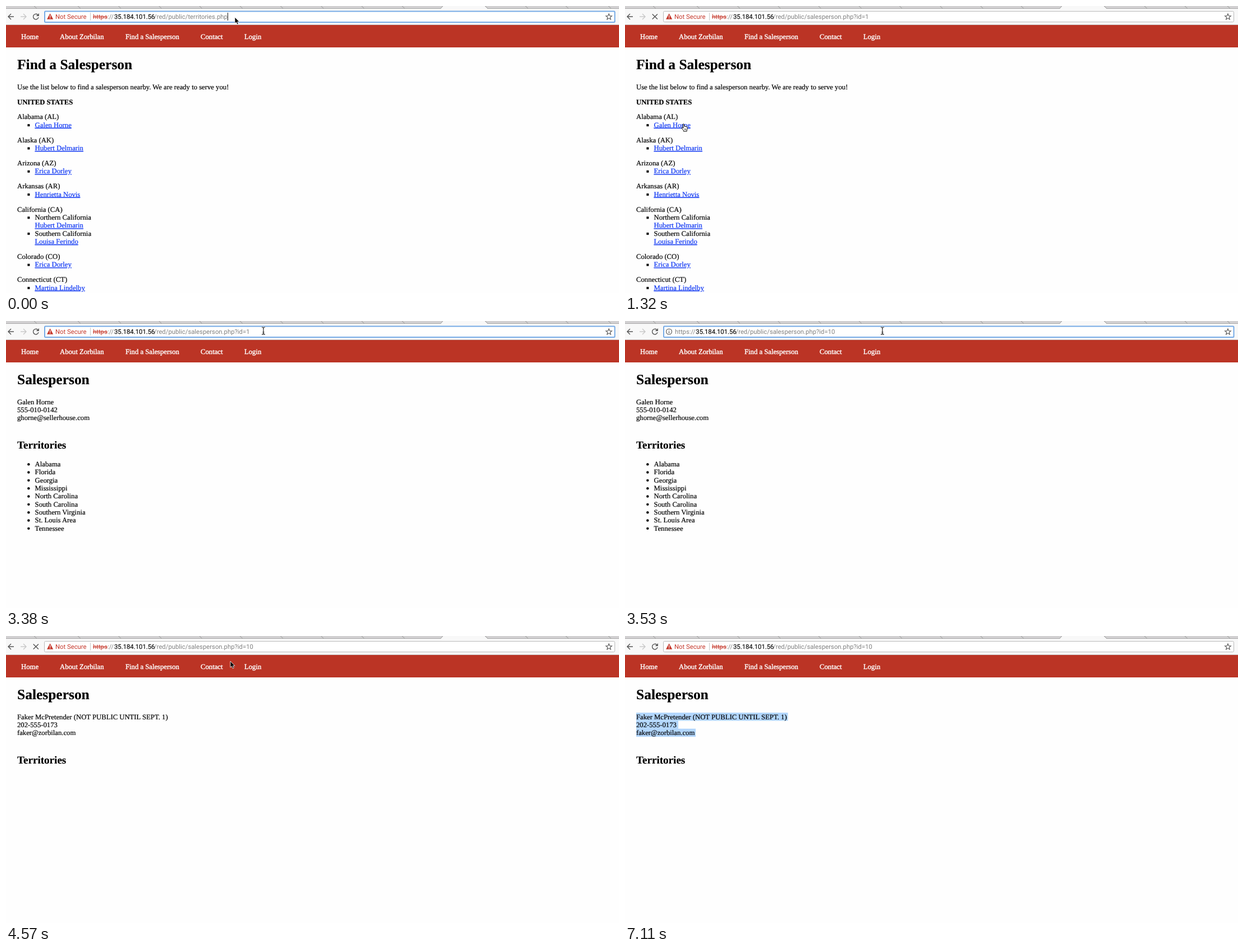
An HTML page for the animation above (8570 ms loop, 1093 px wide and 513 px high).

```html
<!DOCTYPE html>
<html lang="en">
<head>
<meta charset="utf-8">
<title>Find a Salesperson</title>
<style>
  html, body { margin: 0; width: 100%; height: 100%; overflow: hidden; background: #fefefe; }
  svg { display: block; }
  text { text-rendering: geometricPrecision; white-space: pre; }
  .page text, .nav text { font: 12.7px "Liberation Serif", "Times New Roman", serif; }
  .page text { stroke: #000; stroke-width: .2; }
  .page .h1 { font-size: 25.47px; font-weight: bold; }
  .page .h2 { font-size: 19.1px; font-weight: bold; }
  .page .b { font-weight: bold; }
  .page .link { fill: #0b34f2; stroke: #0b34f2; text-decoration: underline; }
  .nav text { fill: #fff; stroke: #fff; stroke-width: .4; }
  .bar text { font: 11.3px Roboto, "Open Sans", sans-serif; fill: #808080; }
  .bar .host { fill: #111; stroke: #111; stroke-width: .2; }
  .bar .bad { fill: #c5372a; }
  .bar .struck { text-decoration: line-through; }
  .line { fill: none; stroke: #555; stroke-width: 1.4; }
</style>
</head>
<body>
<svg id="stage" width="1093" height="513" viewBox="0 0 1093 513"></svg>
<script>
const LOOP = 8570;
const STEP = 14.33;

const text = (x, y, s, cls = '') => `<text x="${x}" y="${y}" class="${cls}">${s}</text>`;
const group = (id, body, cls = '') => `<g id="${id}" class="${cls}">${body}</g>`;
const rect = (x, y, w, h, fill) => `<rect x="${x}" y="${y}" width="${w}" height="${h}" fill="${fill}"/>`;

// Browser frame
function tabs() {
  const edges = [55, ...Array.from({ length: 9 }, (_, i) => 133 + 72.25 * i), 931, 1003, 1079];
  return rect(0, 0, 1093, 5, '#d2d1d2') + rect(0, 4, 1093, 1, '#a9a9a9') +
    edges.map(x => `<path d="M${x - 5} 0L${x} 4.5" stroke="#999" fill="none"/>`).join('') +
    '<path d="M775 5L779 0H854L859 5Z" fill="#f8f8f8"/>' +
    '<path d="M775 4.5L779 0M854 0L859 4.5" stroke="#999" fill="none"/>';
}

function toolbar() {
  const star = Array.from({ length: 10 }, (_, i) => {
    const r = i % 2 ? 2.4 : 5.6, a = i * Math.PI / 5;
    return `${(1075 + r * Math.sin(a)).toFixed(2)},${(19.5 - r * Math.cos(a)).toFixed(2)}`;
  }).join(' ');
  return rect(0, 5, 1093, 29, '#f8f8f8') + rect(0, 33, 1093, 1, '#cac4c4') +
    '<path class="line" d="M14 19H4.5M9 14L4 19L9 24"/>' +
    '<path class="line" style="stroke:#c9c9c9" d="M26 19H35.5M31 14L36 19L31 24"/>' +
    group('reload', '<path class="line" d="M56.6 15.6A4.8 4.8 0 1 0 58 20.2"/><path d="M58.8 13V18H53.8Z" fill="#555"/>') +
    group('stop', '<path class="line" d="M48.7 14.4L57.9 23.6M57.9 14.4L48.7 23.6"/>') +
    '<rect x="68.5" y="9.5" width="1017" height="19" rx="2" fill="#fff" stroke="#b9b9b9"/>' +
    '<rect id="ring" x="69" y="9.5" width="1016.5" height="19.5" rx="1.5" fill="none" stroke="#76abe6" stroke-width="2"/>' +
    `<polygon points="${star}" class="line" style="stroke-width:1.1"/>`;
}

const SALES = '/red/public/salesperson.php?id=1';

function address() {
  const warn = '<path d="M78.6 13.2L84.2 23.8H73Z" fill="#c5372a"/>' +
    '<path d="M78.6 16.6V20.4M78.6 21.3V22.6" stroke="#fff" stroke-width="1.2"/>' +
    text(88, 23, 'Not Secure', 'bad') + rect(150, 12, 1, 14, '#c8c8c8') +
    text(155, 23, 'https', 'bad struck') + text(181, 23, '://') +
    text(193, 23, '35.184.101.56', 'host');
  const info = '<circle cx="78.5" cy="19" r="5" class="line" style="stroke-width:1.1"/>' +
    '<path d="M78.5 18.2V22M78.5 15.8V17.1" stroke="#555" stroke-width="1.2"/>' +
    text(89, 23, 'https://') + text(126.3, 23, '35.184.101.56', 'host') + text(197.5, 23, SALES + '0');
  return group('warn', warn) + group('info', info) +
    group('urlList', text(264, 23, '/red/public/territories.php') + rect(395, 12, 1, 14, '#111')) +
    group('urlOne', text(264, 23, SALES)) +
    group('urlTen', text(264, 23, SALES + '0'));
}

function nav() {
  const items = [[27, 'Home'], [96, 'About Zorbilan'], [213, 'Find a Salesperson'], [347, 'Contact'], [425, 'Login']];
  return rect(0, 34, 1093, 40, '#bb3425') + items.map(([x, s]) => text(x, 59, s)).join('');
}

// Pages
const states = [
  ['Alabama (AL)', '-Galen Horne'],
  ['Alaska (AK)', '-Hubert Delmarin'],
  ['Arizona (AZ)', '-Erica Dorley'],
  ['Arkansas (AR)', '-Henrietta Novis'],
  ['California (CA)', '*Northern California', 'Hubert Delmarin', '*Southern California', 'Louisa Ferindo'],
  ['Colorado (CO)', '-Erica Dorley'],
  ['Connecticut (CT)', '-Martina Lindelby']
];

function listPage() {
  let y = 202.4;
  let out = text(20, 113.2, 'Find a Salesperson', 'h1') +
    text(20, 148.5, 'Use the list below to find a salesperson nearby. We are ready to serve you!') +
    text(20, 175.5, 'UNITED STATES', 'b');
  for (const [name, ...rows] of states) {
    out += text(20, y, name);
    for (const row of rows) {
      y += STEP;
      const mark = '-*'.includes(row[0]);
      if (mark) out += rect(38.4, y - 5.6, 4, 4, '#000');
      out += text(51.6, y, mark ? row.slice(1) : row, row[0] === '*' ? '' : 'link');
    }
    y += 27;
  }
  return out;
}

function personPage(lines, areas) {
  return text(20, 113.2, 'Salesperson', 'h1') +
    lines.map((s, i) => text(20, 148.5 + i * STEP, s)).join('') +
    text(20, 228, 'Territories', 'h2') +
    areas.map((s, i) => {
      const y = 259.9 + i * STEP;
      return `<circle cx="40.3" cy="${y - 3.7}" r="2.2"/>` + text(51.6, y, s);
    }).join('');
}

const areas = ['Alabama', 'Florida', 'Georgia', 'Mississippi', 'North Carolina', 'South Carolina',
  'Southern Virginia', 'St. Louis Area', 'Tennessee'];
const marked = [270.5, 75, 106].map((w, i) => rect(20, 137 + i * STEP, w, STEP + 0.2, '#b2d6fd')).join('');

// Pointer shapes, hot spot at 0,0
const arrow = '<path d="M0 0V11.2L2.5 8.9L4.3 13L6.3 12.1L4.6 8.2H8Z" fill="#000" stroke="#fff" stroke-width=".8"/>';
const hand = '<path d="M-2.6 -5.4C-2.6 -6.6 -.9 -6.6 -.7 -5.4L.1 -1.6L1.6 -1.9L3.2 -1.4L4.8 -.7C5.6 1 5.2 3.4 4.2 5.2V7H-1.6V5.6C-2.8 4 -4.2 2.4 -5 .8C-4.6 -.4 -3.2 0 -1.8 1.2Z" fill="#fff" stroke="#000"/>' +
  '<path d="M.6 2.2V4.8M2.4 2.2V4.8" stroke="#000" stroke-width=".8"/>';
const beamPath = 'M-3 -6.5Q0 -6.5 0 -4.5Q0 -6.5 3 -6.5M0 -5V5M-3 6.5Q0 6.5 0 4.5Q0 6.5 3 6.5M-1.5 2.5H1.5';
const beam = `<path d="${beamPath}" fill="none" stroke="#fff" stroke-width="2.4" opacity=".7"/>` +
  `<path d="${beamPath}" fill="none" stroke="#111" stroke-width="1.1"/>`;

const stage = document.getElementById('stage');
stage.innerHTML =
  group('list', listPage(), 'page') +
  group('first', personPage(['Galen Horne', '555-010-0142', 'ghorne@sellerhouse.com'], areas), 'page') +
  group('marked', marked) +
  group('hidden', personPage(['Faker McPretender (NOT PUBLIC UNTIL SEPT. 1)', '202-555-0173', 'faker@zorbilan.com'], []), 'page') +
  tabs() + toolbar() + group('bar', address(), 'bar') + group('nav', nav(), 'nav') +
  group('pointer', group('arrow', arrow) + group('hand', hand) + group('beam', beam));

// Held steps: each row is [time, properties]
function run(id, rows) {
  const keys = rows.map(([t, p]) => ({ ...p, offset: t / LOOP, easing: 'steps(1, end)' }));
  keys.push({ ...rows[rows.length - 1][1], offset: 1 });
  document.getElementById(id).animate(keys, { duration: LOOP, iterations: Infinity });
}

// Visible during each [from, to] span
function show(id, ...spans) {
  const rows = spans[0][0] > 0 ? [[0, { opacity: 0 }]] : [];
  for (const [from, to] of spans) {
    rows.push([from, { opacity: 1 }]);
    if (to < LOOP) rows.push([to, { opacity: 0 }]);
  }
  run(id, rows);
}

show('list', [0, 1610]);
show('first', [1610, 4570]);
show('hidden', [4570, LOOP]);
show('marked', [5910, LOOP]);
show('ring', [0, 1170], [2350, 4130]);
show('reload', [0, 1320], [2500, 4130], [4870, LOOP]);
show('stop', [1320, 2500], [4130, 4870]);
show('warn', [0, 3530], [4570, LOOP]);
show('info', [3530, 4570]);
show('urlList', [0, 1320]);
show('urlOne', [1320, 3530]);
show('urlTen', [4570, LOOP]);

const moves = [
  [0, 408, 20, 'arrow'], [150, 404, 24, 'arrow'], [300, 375, 45, 'arrow'], [440, 320, 85, 'arrow'],
  [590, 250, 130, 'arrow'], [730, 180, 175, 'arrow'], [880, 130, 205, 'arrow'], [1030, 110, 216, 'hand'],
  [1170, 106, 217, 'hand'], [1610, 106, 217, 'arrow'], [1760, 135, 190, 'arrow'], [1910, 250, 110, 'arrow'],
  [2050, 400, 40, 'arrow'], [2200, 463, 17.5, 'beam'], [2500, 460, 17.5, 'beam'], [2640, 459, 17.5, 'beam'],
  [4420, 455, 19, 'beam'], [4570, 400, 45, 'arrow'], [4720, 280, 85, 'arrow'], [4870, 150, 120, 'arrow'],
  [5020, 60, 144, 'beam'], [5170, 29, 148, 'beam'], [5320, 24, 145, 'beam'], [5470, 21, 143.5, 'beam'],
  [5760, 42.5, 143.5, 'beam'], [5910, 222.5, 206.5, 'beam'], [6660, 560, 350, 'arrow'],
  [6810, 831, 457, 'arrow'], [7110, 831, 457, 'none']
];
run('pointer', moves.map(([t, x, y]) => [t, { transform: `translate(${x}px, ${y}px)` }]));
for (const kind of ['arrow', 'hand', 'beam']) {
  run(kind, moves.map(m => [m[0], { opacity: m[3] === kind ? 1 : 0 }]));
}
</script>
</body>
</html>
```
